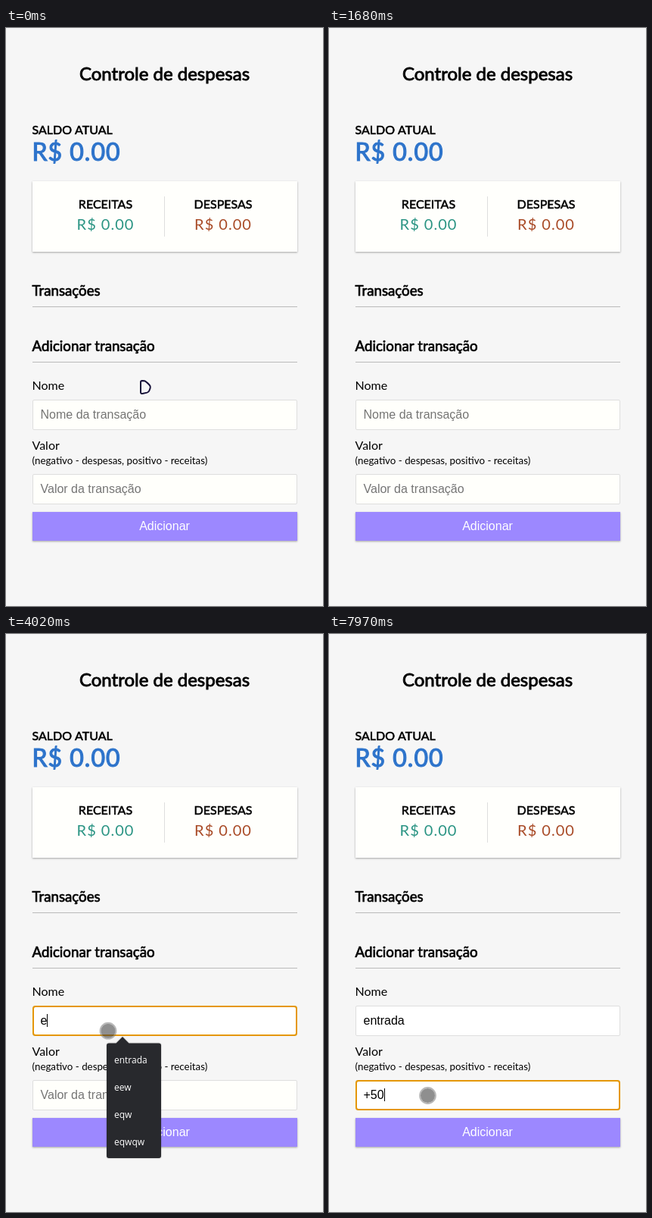
Animation of 419x762 px, one loop 8000 ms. Source, as an HTML page with a canvas:

```html
<!DOCTYPE html>
<html lang="pt">
<head>
<meta charset="utf-8">
<title>Controle de despesas</title>
<style>
html, body { margin: 0; width: 100%; height: 100%; overflow: hidden; background: #f6f6f6; }
canvas { display: block; width: 419px; height: 762px; }
</style>
</head>
<body>
<canvas id="stage"></canvas>
<script>
const W = 419, H = 762, LOOP = 8000;
const LATO = 'Lato, sans-serif';
const ARIAL = '"Liberation Sans", Arial, sans-serif';
const OPEN = '"Open Sans", sans-serif';
const LEFT = 34.5;

const canvas = document.getElementById('stage');
const ctx = canvas.getContext('2d');
const dpr = window.devicePixelRatio || 1;
canvas.width = W * dpr;
canvas.height = H * dpr;

const clamp = v => Math.max(0, Math.min(1, v));
const span = (t, a, b) => clamp((t - a) / (b - a));
const lerp = (a, b, k) => a + (b - a) * k;

function text(str, x, y, size, o = {}) {
  ctx.font = `${o.weight || 400} ${size}px ${o.family || LATO}`;
  ctx.letterSpacing = (o.spacing || 0) + 'px';
  ctx.fillStyle = ctx.strokeStyle = o.color || '#000';
  ctx.textAlign = 'left';
  if (o.center) x -= ctx.measureText(str).width / 2;
  ctx.fillText(str, x, y);
  // Synthetic bold: thicken the regular weight
  if (o.thick) {
    ctx.lineWidth = size / 28;
    ctx.strokeText(str, x, y);
  }
  ctx.letterSpacing = '0px';
}

function rect(x, y, w, h, color) {
  ctx.fillStyle = color;
  ctx.fillRect(x, y, w, h);
}

function roundRect(x, y, w, h, r) {
  ctx.beginPath();
  ctx.roundRect(x, y, w, h, r);
}

function raised(x, y, w, h, r, color) {
  ctx.save();
  ctx.fillStyle = color;
  ctx.shadowOffsetY = dpr;
  for (const [blur, alpha] of [[3, 0.12], [2, 0.24]]) {
    ctx.shadowBlur = blur * dpr;
    ctx.shadowColor = `rgba(0,0,0,${alpha})`;
    roundRect(x, y, w, h, r);
    ctx.fill();
  }
  ctx.restore();
}

function heading(str, y) {
  text(str, LEFT, y, 18.72, { thick: true });
  rect(35, y + 14, 350, 1, '#bbb');
}

function money(label, x, color) {
  text(label, x, 238, 16, { thick: true, center: true });
  text('R$ 0.00', x, 266, 20, { color, spacing: 1, center: true });
}

function page() {
  rect(0, 0, W, H, '#f6f6f6');
  text('Controle de despesas', 209.5, 69, 24, { thick: true, center: true });
  text('SALDO ATUAL', LEFT, 140, 16, { thick: true });
  text('R$ 0.00', LEFT, 175, 32, { thick: true, spacing: 1, color: '#2e74cb' });

  raised(35, 202, 350, 93, 0, '#fffffc');
  rect(209, 222, 1, 53, '#dedede');
  money('RECEITAS', 131.5, '#2a9483');
  money('DESPESAS', 287, '#a94b27');

  heading('Transações', 353);
  heading('Adicionar transação', 426);
  text('Nome', LEFT, 477, 16);
  text('Valor', LEFT, 556, 16);
  text('(negativo - despesas, positivo - receitas)', LEFT, 575, 13.333);

  raised(35, 638, 350, 38, 0, '#9c88ff');
  text('Adicionar', 209.5, 662, 16, { family: ARIAL, color: '#fff', center: true });
}

function field(y, hint, value, focused, caret) {
  roundRect(35.5, y + 0.5, 349, 39, 1.5);
  ctx.fillStyle = value || focused ? '#fff' : '#fffffb';
  ctx.fill();
  ctx.lineWidth = 1;
  ctx.strokeStyle = '#dedede';
  ctx.stroke();
  text(value || hint, 45.5, y + 25, 16, { family: ARIAL, color: value ? '#000' : '#757575' });
  if (focused) {
    roundRect(36, y + 1, 348, 38, 3);
    ctx.lineWidth = 2;
    ctx.strokeStyle = '#e59700';
    ctx.stroke();
  }
  if (caret) {
    const w = value ? ctx.measureText(value).width : 0;
    rect(Math.round(45.5 + w), y + 11, 1, 17, '#000');
  }
}

// Number of keys pressed by time t
const typed = (str, times, t) => str.slice(0, times.filter(k => t >= k).length);

const NAME_KEYS = [3600, 4170, 4580, 4750, 4850, 4990, 5080];
const VALUE_KEYS = [7200, 7810, 7970];

function fields(t) {
  const first = t >= 3530 && t < 5590;
  const second = t >= 5590;
  const blinkOff = (t >= 6090 && t < 6590) || (t >= 7080 && t < 7200) || (t >= 7640 && t < 7810);
  field(490, 'Nome da transação', typed('entrada', NAME_KEYS, t), first, first);
  field(588, 'Valor da transação', typed('+50', VALUE_KEYS, t), second, second && !blinkOff);
}

function suggestions(t) {
  const alpha = 1 - span(t, 5080, 5188);
  if (t < 3640 || alpha <= 0) return;
  const items = t < NAME_KEYS[1] ? ['entrada', 'eew', 'eqw', 'eqwqw'] : ['entrada'];
  const scale = 1 - 0.04 * (1 - alpha);
  const layer = new Path2D();
  layer.moveTo(145, 540);
  layer.lineTo(154, 531);
  layer.lineTo(163, 540);
  layer.closePath();
  layer.roundRect(133, 539.5, 72, 7.5 + 36 * items.length, 3);

  ctx.save();
  ctx.globalAlpha = alpha;
  ctx.translate(169, 550);
  ctx.scale(scale, scale);
  ctx.translate(-169, -550);
  ctx.fillStyle = '#28292d';
  ctx.shadowColor = 'rgba(0,0,0,0.3)';
  ctx.shadowBlur = 2 * dpr;
  ctx.fill(layer);
  ctx.shadowColor = 'transparent';
  items.forEach((s, i) => text(s, 143, 566 + 36 * i, 12, { family: OPEN, color: '#fff' }));
  ctx.restore();
}

function dialog(t) {
  if (t < 60 || t >= 1680) return;
  ctx.save();
  ctx.globalAlpha = lerp(0.25, 1, span(t, 60, 240));
  ctx.save();
  ctx.shadowColor = 'rgba(0,0,0,0.55)';
  ctx.shadowBlur = 3 * dpr;
  ctx.shadowOffsetY = dpr;
  rect(111, -20, 330, 105, '#29292c');
  ctx.restore();

  ctx.lineWidth = 1.5;
  ctx.strokeStyle = '#929295';
  ctx.strokeRect(129.75, -5.25, 10.5, 10.5);
  text('Não perguntar novamente', 155, 4, 12, { family: OPEN, color: '#f2f2f2' });

  roundRect(377, 36.5, 90, 33, 16.5);
  ctx.lineWidth = 1.5;
  ctx.strokeStyle = '#b5431f';
  ctx.stroke();
  roundRect(379.5, 39, 85, 28, 14);
  ctx.fillStyle = '#ff5a2b';
  ctx.fill();
  text('Ativar', 400, 57, 11.5, { family: OPEN, weight: 600, color: '#fff' });
  ctx.restore();
}

function pointer(t) {
  if (t >= 960) return;
  const k = t < 740 ? 0 : lerp(0.2, 1, span(t, 740, 915));
  ctx.save();
  ctx.translate(lerp(177, 401, k), lerp(464, 200, k));
  ctx.beginPath();
  ctx.moveTo(1, 3);
  ctx.quadraticCurveTo(1, 1, 3, 1);
  ctx.lineTo(6, 1.2);
  ctx.quadraticCurveTo(8, 1.6, 12.5, 6.5);
  ctx.quadraticCurveTo(14.4, 8.5, 13.7, 10.5);
  ctx.lineTo(12.4, 14);
  ctx.quadraticCurveTo(11.7, 16, 9.5, 16.6);
  ctx.lineTo(3.5, 18);
  ctx.quadraticCurveTo(1, 18.4, 1, 16);
  ctx.closePath();
  ctx.lineWidth = 2;
  ctx.strokeStyle = '#150f38';
  ctx.stroke();
  ctx.restore();
}

// Waypoints of the touch cursor: time, x, y
const PATH = [
  [2060, 410, 482], [2160, 325, 522], [2230, 272, 530], [2330, 235, 523],
  [2640, 235, 523], [2660, 226.5, 511.5], [2960, 190, 503], [3130, 176, 503], [3250, 178.5, 507.5],
  [3740, 178.5, 507.5], [4250, 99.5, 536],
  [5200, 99.5, 536], [5530, 130.5, 608.5]
];

function touch(t) {
  if (t < PATH[0][0]) return;
  let i = PATH.findIndex(p => p[0] > t);
  if (i < 0) i = PATH.length - 1;
  const [a, b] = [PATH[i - 1], PATH[i]];
  const k = span(t, a[0], b[0]);
  const x = lerp(a[1], b[1], k), y = lerp(a[2], b[2], k);
  ctx.beginPath();
  ctx.arc(x, y, 9.5, 0, 7);
  ctx.fillStyle = 'rgba(55,55,55,0.56)';
  ctx.fill();
  ctx.beginPath();
  ctx.arc(x, y, 10.4, 0, 7);
  ctx.lineWidth = 2;
  ctx.strokeStyle = 'rgba(115,115,115,0.5)';
  ctx.stroke();
}

function draw() {
  const t = performance.now() % LOOP;
  ctx.setTransform(dpr, 0, 0, dpr, 0, 0);
  page();
  fields(t);
  suggestions(t);
  dialog(t);
  pointer(t);
  touch(t);
  requestAnimationFrame(draw);
}
draw();
</script>
</body>
</html>
```
